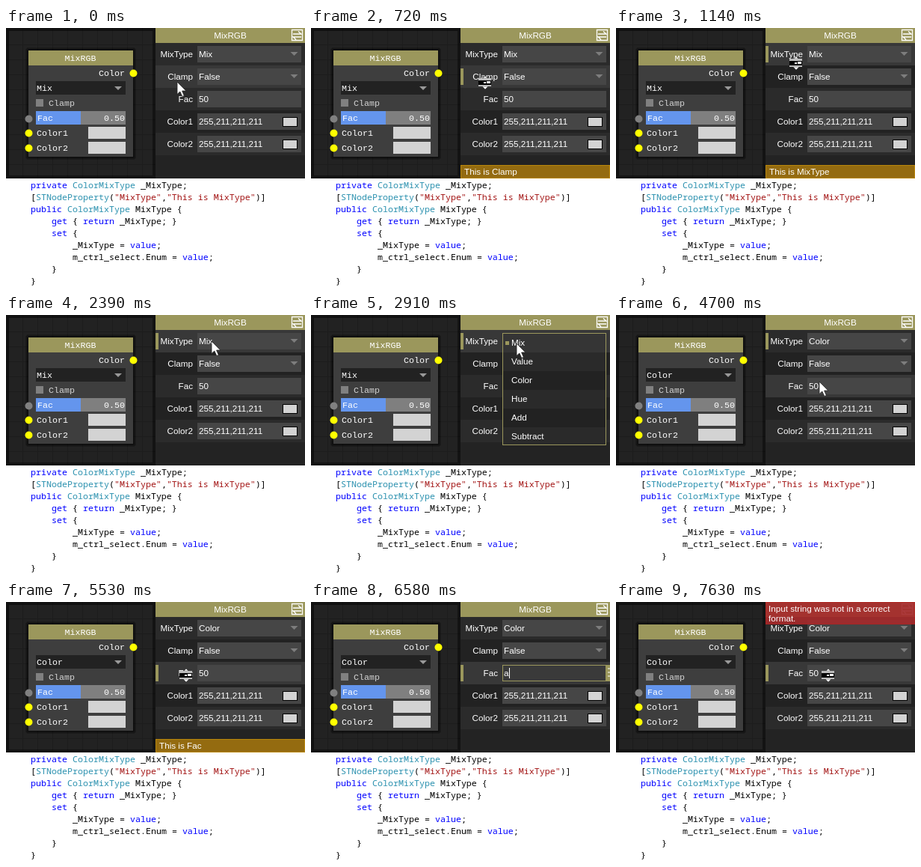
Animation, 400 px wide and 346 px high, one loop 8000 ms. Source, as an HTML page:

```html
<!DOCTYPE html>
<html lang="en">
<head>
<meta charset="utf-8">
<title>Node property grid</title>
<style>
  html, body { margin: 0; width: 100%; height: 100%; overflow: hidden; background: #fff; }
  svg { display: block; width: 400px; height: 346px; }
  rect { shape-rendering: crispEdges; }
  text { white-space: pre; }
  .node { font: 11.67px "Liberation Mono", monospace; fill: #fff; }
  .ui { font: 11.7px "Liberation Sans", Arial, sans-serif; fill: #fff; }
  .code { font: 11.67px "Noto Sans Mono", monospace; fill: #000; }
  .k { fill: #00f; }
  .t { fill: #2b91af; }
  .s { fill: #a31515; }
</style>
</head>
<body>
<svg id="stage" viewBox="0 0 400 346" xmlns="http://www.w3.org/2000/svg"></svg>
<script>
const LOOP = 8000;
const KHAKI = '#9b975c', LIGHT = '#d3d3d3';
const labels = ['MixType', 'Clamp', 'Fac', 'Color1', 'Color2'];
const options = ['Mix', 'Value', 'Color', 'Hue', 'Add', 'Subtract'];

// time, pointer x, pointer y, pointer kind (a: arrow, p: press, '': hidden)
const steps = [
  [0, 229, 72, 'a'], [100, 230, 73, 'p'], [720, 232, 72, 'p'],
  [930, 235, 62, 'a'], [1035, 239, 49, 'a'], [1140, 240, 46, 'p'],
  [1760, 243, 45, 'a'], [1970, 252, 42, 'a'], [2180, 264, 38, 'a'],
  [2390, 275, 35, 'a'], [2600, 275, 36, 'a'], [2790, 275, 36, 'a'],
  [2905, 275, 38, 'a'], [3020, 276, 41, 'a'], [3240, 278, 53, 'a'],
  [3450, 282, 70, 'a'], [3610, 286, 83, 'a'], [3750, 286, 84, 'a'],
  [3870, 286, 84, 'a'], [4700, 272, 89, 'a'], [4805, 255, 94, 'a'],
  [4910, 241, 97, 'p'], [5530, 240, 97, 'p'], [5740, 246, 98, 'a'],
  [5770, 252, 97, 'a'], [5950, 266, 96, 'a'], [6160, 281, 95, 'a'],
  [6320, 283, 95, 'a'], [6440, 283, 95, ''], [6580, 283, 95, ''],
  [7000, 283, 95, ''], [7210, 283, 95, 'a'], [7630, 283, 97, 'p']
];

const box = (x, y, w, h, fill, more = '') =>
  `<rect x="${x}" y="${y}" width="${w}" height="${h}" fill="${fill}" ${more}/>`;
// box with a one pixel border inside its bounds
const framed = (x, y, w, h, fill, edge) =>
  box(x, y, w, h, edge) + box(x + 1, y + 1, w - 2, h - 2, fill);
const text = (cls, x, mid, str, more = '') =>
  `<text class="${cls}" x="${x}" y="${mid + 4}" ${more}>${str}</text>`;
const dot = (x, y, fill) => `<circle cx="${x + .5}" cy="${y + .5}" r="5" fill="${fill}"/>`;
const path = (d, fill, more = '') => `<path d="${d}" fill="${fill}" ${more}/>`;
const END = 'text-anchor="end"', MID = 'text-anchor="middle"';

function canvasGrid() {
  let out = box(0, 0, 200, 201, '#222');
  for (let p = 2; p < 200; p += 20) {
    out += box(p, 0, 1, 201, '#1c1c1c') + box(0, p, 200, 1, '#1c1c1c');
  }
  return out + box(2, 2, 196, 197, 'none', 'stroke="#000" stroke-width="4" opacity=".45"');
}

function nodeView(mode) {
  let out = canvasGrid();
  for (let i = 4; i > 0; i--) {
    out += `<rect x="${30 - i}" y="${30 - i}" width="${140 + 2 * i}" height="${142 + 2 * i}" rx="${i}" fill="#000" opacity=".2"/>`;
  }
  return out +
    box(30, 30, 140, 142, '#3e3e3e') + box(30, 30, 140, 20, KHAKI) +
    text('node', 99.5, 40, 'MixRGB', MID) +
    text('node', 159, 60, 'Color', END) + dot(170, 60, '#ff0') +
    box(40, 71, 120, 18, '#222') + text('node', 41, 80, mode) +
    path('M145 78h10l-5 5z', '#999') +
    box(40, 95, 10, 10, '#808080') + text('node', 57, 100, 'Clamp', `style="fill:${LIGHT}"`) +
    box(40, 111, 120, 18, '#7f7f7f') + box(40, 111, 60, 18, '#6495ed') +
    text('node', 42, 120, 'Fac') + text('node', 159, 120, '0.50', END) +
    box(110, 132, 50, 16, LIGHT) + box(110, 152, 50, 16, LIGHT) +
    text('node', 41, 140, 'Color1') + text('node', 41, 160, 'Color2') +
    dot(30, 121, '#808080') + dot(30, 140, '#ff0') + dot(30, 160, '#ff0');
}

function propertyRow(i, value, hover, selected) {
  const y = 20 + 30 * i, mid = y + 15;
  let out = box(200, y, 200, 30, hover ? '#383838' : i % 2 ? '#222' : '#2b2b2b');
  if (selected) out += box(200, y + 4, 4, 22, KHAKI);
  out += text('ui', 250, mid, labels[i], END) +
    box(256, y + 4, 139, 22, '#464646') + text('ui', 258, mid, value);
  if (i < 2) out += path(`M380.5 ${mid - 3}h10l-5 5z`, '#7d7d7d');
  if (i > 2) out += framed(370, y + 9, 20, 13, LIGHT, '#000');
  return out;
}

function popup(y) {
  const over = Math.floor((y - 25) / 25);
  let out = framed(256, 24, 139, 150, '#222', KHAKI);
  options.forEach((name, i) => {
    const top = 25 + 25 * i;
    out += box(257, top, 137, i === 5 ? 23 : 25, i === over ? '#353535' : i % 2 ? '#2a2a2a' : '#222') +
      text('ui', 268, top + 12, name);
  });
  return out + box(260, 35, 5, 5, KHAKI);
}

function editor(t) {
  let out = framed(256, 84, 150, 22, '#3a3a3a', KHAKI) +
    box(394, 85, 6, 21, KHAKI) + path('M397 89h3M397 94h3M397 99h3', 'none', 'stroke="#fff"');
  if (t < 6440) return out + box(258, 88, 13, 14, '#0078d7') + text('ui', 258, 95, '50');
  const typed = t >= 6580;
  if (typed) out += text('ui', 258, 95, 'a');
  return out + (t < 7000 ? box(typed ? 265 : 258, 88, 1, 14, '#fff') : '');
}

function pointer(x, y, kind) {
  if (!kind) return '';
  const at = `<g transform="translate(${x} ${y})">`;
  if (kind === 'a') {
    return at + path('M0 0V16.5L3.8 13l3 6.5 2.6-1.1L6.6 12H11.8Z', '#fff',
      'stroke="#222" stroke-width=".8"') + '</g>';
  }
  return at + path('M-2 -5L1 -8 4 -5zM-3 6L1 10 5 6z', '#fff', 'stroke="#222" stroke-width=".5"') +
    box(-8, -5, 17, 11, '#bbb') + box(-8, -2, 17, 6, '#000') +
    box(3, -1, 5, 3, '#fff') + box(-1, 0, 3, 2, '#fff') + '</g>';
}

function header() {
  return box(200, 0, 200, 20, KHAKI) + text('ui', 300, 10, 'MixRGB', MID) +
    path('M382.5 2.5h14v14h-14zM384 8h11L391 4.5M395 12H384L388 15.5',
      'none', 'stroke="#fff" stroke-width="1.3"');
}

function gridView(t, x, y, kind) {
  const open = t >= 2790 && t < 3870;
  const mode = t < 3870 ? 'Mix' : 'Color';
  const values = [mode, 'False', '50', '255,211,211,211', '255,211,211,211'];
  const hover = open ? 0 : Math.floor((y - 20) / 30);
  const selected = t < 100 ? -1 : t < 1140 ? 1 : t < 4910 ? 0 : 2;
  let out = box(200, 0, 200, 201, '#232323') + header();
  values.forEach((v, i) => out += propertyRow(i, v, i === hover, i === selected));
  if (open) out += popup(y);
  if (t >= 6320 && t < 7210) out += editor(t);
  if (kind === 'p' && t < 6000) {
    out += framed(200, 183, 200, 18, '#946b10', '#b8860b') +
      text('ui', 205, 192, 'This is ' + labels[selected]);
  }
  if (t >= 7210) {
    out += `<g opacity=".92">${framed(200, 0, 200, 30, '#a52a2c', '#b22222')}</g>` +
      text('ui', 204, 9, 'Input string was not in a correct') + text('ui', 204, 22, 'format.');
  }
  return out + pointer(x, y, kind);
}

const span = (cls, str) => `<tspan class="${cls}">${str}</tspan>`;
const k = s => span('k', s), ty = s => span('t', s), st = s => span('s', `"${s}"`);
const code = [
  [0, `${k('private')} ${ty('ColorMixType')} _MixType;`],
  [0, `[${ty('STNodeProperty')}(${st('MixType')},${st('This is MixType')})]`],
  [0, `${k('public')} ${ty('ColorMixType')} MixType {`],
  [1, `${k('get')} { ${k('return')} _MixType; }`],
  [1, `${k('set')} {`],
  [2, `_MixType = ${k('value')};`],
  [2, `m_ctrl_select.Enum = ${k('value')};`],
  [1, '}'],
  [0, '}']
];
const codeView = box(0, 201, 400, 145, '#fff') +
  code.map(([tab, line], i) => text('code', 33 + 28 * tab, 210 + 16 * i, line)).join('');

const stage = document.getElementById('stage');
stage.innerHTML = '<g></g><g></g>' + codeView;
const [left, right] = stage.children;
let shownStep = -1, shownMode = '';

function draw(now) {
  const t = now % LOOP;
  let i = steps.length - 1;
  while (steps[i][0] > t) i--;
  if (i !== shownStep) {
    const [at, x, y, kind] = steps[i];
    const mode = at < 3870 ? 'Mix' : 'Color';
    if (mode !== shownMode) left.innerHTML = nodeView(shownMode = mode);
    right.innerHTML = gridView(at, x, y, kind);
    shownStep = i;
  }
}

const start = performance.now();
function tick() {
  draw(performance.now() - start);
  requestAnimationFrame(tick);
}
tick();
</script>
</body>
</html>
```
